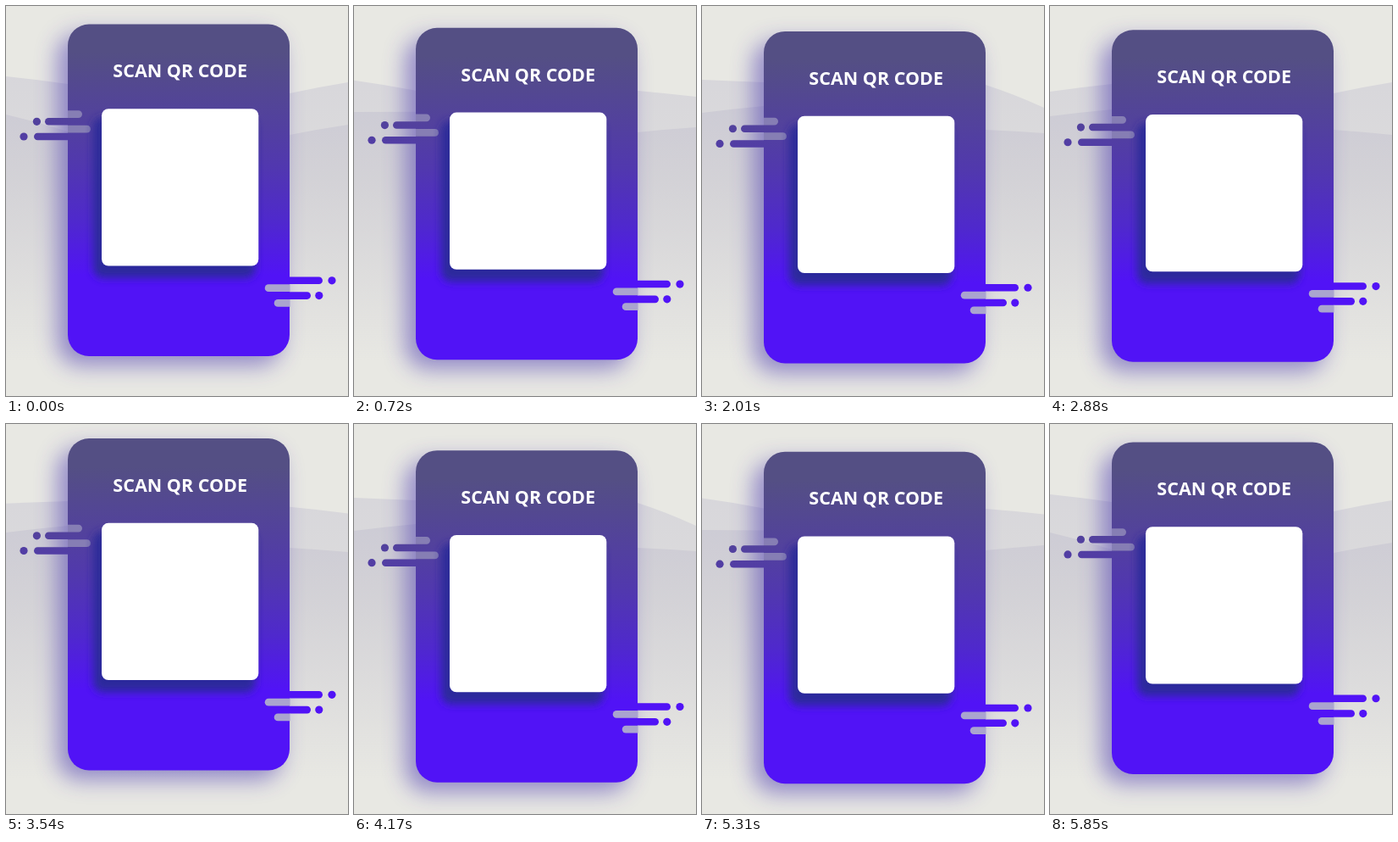
Animation, 404 px wide and 460 px high, one loop 6.03 s. Source, as an HTML page:

```html
<!DOCTYPE html>
<html lang="en">
<head>
<meta charset="utf-8">
<title>Floating scan card</title>
<style>
  html, body { margin: 0; width: 100%; height: 100%; overflow: hidden; background: #e8e8e3; }
  svg { display: block; width: 404px; height: 460px; }
  text { font: bold 21.5px "Open Sans", "Noto Sans", sans-serif; fill: #fff; text-anchor: middle; }
</style>
</head>
<body>
<svg viewBox="0 0 404 460">
  <defs>
    <linearGradient id="body" gradientUnits="userSpaceOnUse" x1="0" y1="55" x2="0" y2="318">
      <stop stop-color="#544f84"/>
      <stop offset=".5" stop-color="#5138ae"/>
      <stop offset=".75" stop-color="#4f29cc"/>
      <stop offset="1" stop-color="#5113f6"/>
    </linearGradient>
    <linearGradient id="mist" gradientUnits="userSpaceOnUse" x1="0" y1="85" x2="0" y2="420">
      <stop stop-color="#a09cc0" stop-opacity=".23"/>
      <stop offset=".35" stop-color="#a09cb8" stop-opacity=".16"/>
      <stop offset="1" stop-color="#a09cb8" stop-opacity="0"/>
    </linearGradient>
    <filter id="soft" x="-20%" y="-20%" width="140%" height="140%"><feGaussianBlur stdDeviation="13.5"/></filter>
    <filter id="near" x="-20%" y="-20%" width="140%" height="140%"><feGaussianBlur stdDeviation="5"/></filter>
  </defs>

  <path class="wave" fill="url(#mist)"/>
  <path class="wave" fill="url(#mist)"/>

  <g id="card">
    <rect x="61" y="33" width="264" height="391" rx="26" fill="#4a38b0" opacity=".54" filter="url(#soft)"/>
    <g fill="url(#body)">
      <rect x="73" y="21.5" width="262" height="391.5" rx="25"/>
      <rect x="46" y="132" width="50" height="8.6" rx="4.3"/>
      <rect x="33" y="149.7" width="60" height="8.6" rx="4.3"/>
      <rect x="310" y="319.5" width="64" height="8.6" rx="4.3"/>
      <rect x="310" y="337.3" width="50" height="8.6" rx="4.3"/>
      <circle cx="36.4" cy="136.3" r="4.6"/>
      <circle cx="21" cy="154" r="4.6"/>
      <circle cx="385" cy="323.8" r="4.6"/>
      <circle cx="369.8" cy="341.6" r="4.6"/>
    </g>
    <g fill="#867eb4">
      <path d="M73 123.2h12.6a4.4 4.4 0 0 1 0 8.8H73z"/>
      <path d="M73 140.8h22.6a4.4 4.4 0 0 1 0 8.8H73z"/>
    </g>
    <g fill="#aaa4cf">
      <path d="M335.5 328.3h-25.4a4.4 4.4 0 0 0 0 8.8h25.4z"/>
      <path d="M335.5 346h-14.4a4.4 4.4 0 0 0 0 8.8h14.4z"/>
    </g>
    <rect x="103" y="131" width="192" height="190" rx="12" fill="#2b2a98" opacity=".95" filter="url(#near)"/>
    <rect x="113" y="121.3" width="185.3" height="185.3" rx="8" fill="#fff"/>
    <text x="205.7" y="84.3">SCAN QR CODE</text>
  </g>
</svg>

<script>
const LOOP = 6030, MOVE_END = 5850, REST_Y = 21.5;
const card = document.getElementById('card');
const waves = document.querySelectorAll('.wave');

// Turning points of the floating card: time, top edge
const bob = [
  [-279, 15], [400, 32.8], [1140, 15], [1840, 32.8], [2490, 15], [3080, 32.8],
  [3670, 15], [4180, 31.2], [4585, 15], [5350, 32.8], [6199, 15]
];

// Wave heights at the left edge, card left, card right, right edge, for two layers
const crest = [83, 92, 103, 90, 128, 148, 152, 140];
const slope = [92, 107, 97, 123, 122, 103, 146, 146];
const hump = [87, 90, 93, 120, 126, 118, 146, 150];
const dip = [101, 92, 103, 90, 130, 122, 146, 152];
const drift = [
  [0, crest], [1410, slope], [2010, hump], [2880, dip],
  [4170, hump], [4770, slope], [5850, crest]
];

// Finds the span around t and hands back its two values with a sine-eased share
function span(keys, t) {
  let i = 1;
  while (i < keys.length - 1 && keys[i][0] < t) i++;
  const [t0, from] = keys[i - 1], [t1, to] = keys[i];
  return [from, to, (1 - Math.cos(Math.PI * (t - t0) / (t1 - t0))) / 2];
}

const mix = (a, b, k) => a + (b - a) * k;
const bend = (a, b) => mix(Math.min(a, b), Math.max(a, b), .42);

function wavePath([a, b, c, d]) {
  return `M0 ${a}Q37 ${bend(a, b)} 73 ${b}L335 ${c}Q370 ${bend(c, d)} 404 ${d}V460H0Z`;
}

function draw(now) {
  const t = Math.min(now % LOOP, MOVE_END);
  card.setAttribute('transform', `translate(0 ${mix(...span(bob, t)) - REST_Y})`);
  const [from, to, k] = span(drift, t);
  const heights = from.map((h, i) => mix(h, to[i], k));
  waves.forEach((w, i) => w.setAttribute('d', wavePath(heights.slice(i * 4, i * 4 + 4))));
}

const start = performance.now();
function tick() {
  draw(performance.now() - start);
  requestAnimationFrame(tick);
}
tick();
</script>
</body>
</html>
```
